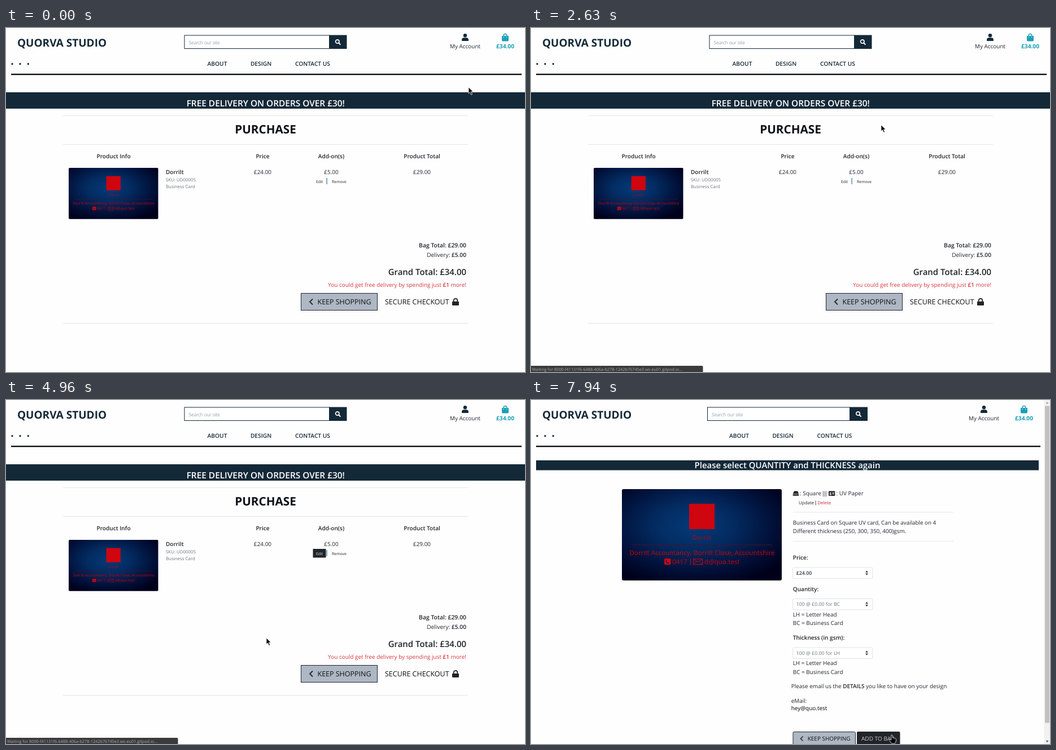
An HTML page for the animation above (8160 ms loop, 919 by 610 pixels).

```html
<!DOCTYPE html>
<html lang="en">
<head>
<meta charset="utf-8">
<title>Shop checkout</title>
<style>
html, body { margin: 0; width: 100%; height: 100%; overflow: hidden; background: #fefefe; }
svg { display: block; width: 919px; height: 610px; }
text { font-family: "Open Sans", "Noto Sans", sans-serif; text-rendering: geometricPrecision; white-space: pre; }
</style>
</head>
<body>
<svg id="stage" viewBox="0 0 919 610"></svg>
<script>
const LOOP = 8160;
const NAVY = '#142938', INK = '#212529', RED = '#d9363e', TEAL = '#1a9fb8', TEAL_DARK = '#0f6674', RULE = '#e6e6e6';

// Text: anchor a = 's' | 'm' | 'e', weight w, fill f, letter spacing ls
function text(x, y, size, str, { a = 's', w = 400, f = INK, ls = 0, id = '' } = {}) {
  const anchor = { s: 'start', m: 'middle', e: 'end' }[a];
  return `<text ${id && `id="${id}"`} x="${x}" y="${y}" font-size="${size}" font-weight="${w}" fill="${f}" text-anchor="${anchor}" letter-spacing="${ls}">${str}</text>`;
}
const bold = s => `<tspan font-weight="600">${s}</tspan>`;
const box = (x, y, w, h, fill, more = '') => `<rect x="${x}" y="${y}" width="${w}" height="${h}" fill="${fill}" ${more}/>`;
const rule = (x1, x2, y) => box(x1, y - .5, x2 - x1, 1, RULE);
const path = (d, fill, more = '') => `<path d="${d}" fill="${fill}" ${more}/>`;
const at = (x, y, body, more = '') => `<g transform="translate(${x} ${y})" ${more}>${body}</g>`;
const chevron = (x, y, s) => path(`M${x + s} ${y - s}l${-s} ${s}l${s} ${s}`, 'none', `stroke="${INK}" stroke-width="${s * .36}"`);

const userIcon = path('M0 0a3.2 3.2 0 0 1 0 6.4a3.2 3.2 0 0 1 0-6.4M-5.9 13v-2.2q0-3.6 3.6-3.6h4.6q3.6 0 3.6 3.6V13z', NAVY);
const bagIcon = path('M-6 4h12v7.7q0 1.8-1.8 1.8h-8.4q-1.8 0-1.8-1.8z', 'currentColor')
  + path('M-2.8 6V3.2a2.8 2.8 0 0 1 5.6 0V6', 'none', 'stroke="currentColor" stroke-width="1.5"')
  + '<circle cx="-2.8" cy="6.2" r=".7" fill="#fff"/><circle cx="2.8" cy="6.2" r=".7" fill="#fff"/>';
const lockIcon = path('M0 6h12v5.8q0 1.2-1.2 1.2H1.2Q0 13 0 11.8z', INK)
  + path('M2.8 7V4a3.2 3.2 0 0 1 6.4 0v3', 'none', `stroke="${INK}" stroke-width="1.8"`);

function header({ left, button, right, nav, user, bag, edge, id }) {
  const links = ['ABOUT', 'DESIGN', 'CONTACT US'];
  return text(20, 32.7, 19, 'QUORVA STUDIO', { w: 700, f: NAVY })
    + box(left + .5, 13, button - left, 23.5, '#fff', `stroke="${NAVY}"`)
    + text(left + 8, 28.6, 8.6, 'Search our site', { f: '#99a5b0', ls: -.3 })
    + box(button, 12.5, right - button, 24.5, NAVY)
    + at((button + right) / 2, 25, `<circle cx="-1" cy="-1" r="3.2" fill="none" stroke="#fff" stroke-width="1.7"/><path d="M1.4 1.4L4.6 4.6" stroke="#fff" stroke-width="2"/>`)
    + links.map((s, i) => text(nav[i], 67.2, 10.2, s, { a: 'm', w: 600, f: NAVY })).join('')
    + [11, 25, 39.3].map(x => `<circle cx="${x}" cy="63.7" r="1.7" fill="${NAVY}"/>`).join('')
    + at(user, 10, userIcon) + text(user, 36.3, 9.95, 'My Account', { a: 'm' })
    + `<g id="${id}" color="${TEAL}">` + at(bag, 10, bagIcon)
    + text(bag, 36.3, 10.2, '£34.00', { a: 'm', w: 700, f: 'currentColor' }) + '</g>'
    + box(9, 81, edge - 9, 2.4, '#0d1114');
}

const cardRed = '#cf0510';
const card = `<g id="card">${box(0, 0, 283, 162, 'url(#night)', 'rx="3"')}`
  + box(119, 26, 45, 45, cardRed)
  + text(141.5, 90, 11.2, 'Dorrilt', { a: 'm', f: '#a80a1c' })
  + box(18, 98.5, 248, 1, '#4a1233')
  + text(142, 116.5, 11.7, 'Dorrilt Accountancy, Dorrilt Close, Accountshire', { a: 'm', f: cardRed })
  + box(75, 123, 11.5, 11, cardRed, 'rx="1.5"')
  + path('M78 125.5q0 5.5 5.5 6', 'none', 'stroke="#04204c" stroke-width="1.6"')
  + text(89, 132.6, 11.7, '0417', { f: cardRed }) + box(121, 123.5, 1, 11, cardRed)
  + path('M126.5 124h16v9.5h-16zl8 5.5l8-5.5m-16 9.5l6-5.4m10 5.4l-6-5.4', 'none', `stroke="${cardRed}"`)
  + text(146, 132.6, 11.7, 'd@quo.test', { f: cardRed }) + '</g>';

const defs = `<defs><radialGradient id="night" cx=".45" cy=".4" r=".68">
<stop offset="0" stop-color="#043a78"/><stop offset=".35" stop-color="#032c62"/>
<stop offset=".72" stop-color="#01113a"/><stop offset="1" stop-color="#00001b"/></radialGradient>${card}</defs>`;

function bagPage() {
  const heads = [[190.5, 'Product Info'], [454.5, 'Price'], [576, 'Add-on(s)'], [736.5, 'Product Total']];
  const prices = [[454.5, '£24.00'], [576, '£5.00'], [736.5, '£29.00']];
  return header({ left: 315.5, button: 572, right: 603.5, nav: [374, 451.5, 543], user: 813, bag: 884, edge: 913, id: 'bag' })
    + box(0, 114, 919, 29, NAVY)
    + text(459.7, 139.2, 15.4, 'FREE DELIVERY ON ORDERS OVER £30!', { a: 'm', w: 600, f: '#fff' })
    + [155.5, 206.5, 523.5].map(y => rule(101, 818, y)).join('')
    + text(459.5, 187, 20.7, 'PURCHASE', { a: 'm', w: 700, f: '#0c1118' })
    + heads.map(([x, s]) => text(x, 231.2, 10.1, s, { a: 'm', w: 600 })).join('')
    + prices.map(([x, s]) => text(x, 259.3, 9.95, s, { a: 'm' })).join('')
    + '<use href="#card" transform="translate(111 248) scale(.56)"/>'
    + text(283, 259.3, 10, 'Dorrilt', { w: 600 })
    + text(283, 272.2, 7.9, 'SKU: UD00005', { f: '#6c757d' })
    + text(283, 284.3, 7.9, 'Business Card', { f: '#6c757d' })
    + box(567.5, 266, 1.2, 11, '#2b7a99')
    + box(543.5, 264, 23, 15.5, INK, 'id="editBg"')
    + text(555, 274.6, 6.9, 'Edit', { a: 'm', id: 'edit' })
    + text(577, 274.6, 6.9, 'Remove')
    + text(815, 388.8, 10.4, 'Bag Total: £29.00', { a: 'e', w: 600 })
    + text(815, 406.2, 10.2, 'Delivery: ' + bold('£5.00'), { a: 'e', w: 500 })
    + text(815, 438.2, 14.95, 'Grand Total: £34.00', { a: 'e', w: 600 })
    + text(815, 458.5, 9.97, `You could get free delivery by spending just ${bold('£1')} more!`, { a: 'e', f: RED })
    + box(522.5, 470.5, 135, 30, '#aeb7c4', `stroke="${INK}"`)
    + chevron(538, 485.5, 5) + text(551.5, 490, 12.47, 'KEEP SHOPPING', { f: '#111' })
    + text(671, 490, 12.47, 'SECURE CHECKOUT', { f: '#111' }) + at(790, 479, lockIcon);
}

function select(y, str, opt) {
  const arrows = path(`M592 ${y + 9.3}l2.5-3.2l2.5 3.2zM592 ${y + 11}l2.5 3.2l2.5-3.2z`, '#343a40');
  return box(463.5, y + .5, 141.5, 19.5, '#fff', 'stroke="#dfe3e7" rx="2"') + text(469.8, y + 13.4, 8.75, str, opt) + arrows;
}

function editPage() {
  const note = y => text(463.7, y, 9.95, 'LH = Letter Head') + text(463.7, y + 15.4, 9.95, 'BC = Business Card');
  const label = (y, s) => text(463.7, y, 10.1, s, { w: 600 });
  const gray = { f: '#6c757d' };
  return box(0, 0, 919, 610, '#fefefe')
    + header({ left: 312, button: 564, right: 596, nav: [368.5, 446, 537.5], user: 802, bag: 873, edge: 902, id: 'bag2' })
    + box(9, 107, 890, 17.5, NAVY)
    + text(454, 120.8, 14.95, 'Please select QUANTITY and THICKNESS again', { a: 'm', w: 600, f: '#fff' })
    + '<use href="#card" transform="translate(161 158)"/>'
    + path('M466 161.5h6l2.3 5h-10.6zM463.7 167.3h10.6v2.5h-10.6z', INK)
    + text(476, 169.2, 9.95, ': Square') + text(514.5, 169.2, 9.95, '|||', { ls: -2.7 })
    + box(527, 161.5, 11.3, 8.6, INK, 'rx="1"')
    + '<circle cx="530.2" cy="165" r="1.2" fill="#fff"/>' + box(528.6, 166.8, 3.3, 1.6, '#fff') + box(533.3, 164, 3.6, 1, '#fff') + box(533.3, 166.2, 3.6, 1, '#fff')
    + text(540.5, 169.2, 9.95, ': UV Paper')
    + text(474, 184.8, 7.95, 'Update') + box(503.7, 178.5, .8, 8, INK)
    + text(507.3, 184.8, 7.95, 'Delete', { f: '#c9253a' })
    + rule(463.5, 748, 199) + rule(463.5, 748, 250.5)
    + text(463.7, 220.8, 9.8, 'Business Card on Square UV card, Can be available on 4')
    + text(463.7, 236.2, 9.95, 'Different thickness (250, 300, 350, 400)gsm.')
    + label(283, 'Price:') + select(296.5, '£24.00', { w: 600, f: '#343a40' })
    + label(338.7, 'Quantity:') + select(352, '100 @ £0.00 for BC', gray) + note(383.8)
    + label(424.8, 'Thickness (in gsm):') + select(438.5, '100 @ £0.00 for LH', gray) + note(470.2)
    + text(460.7, 511, 9.94, `Please email us the ${bold('DETAILS')} you like to have on your design`)
    + text(460.7, 536.6, 9.95, 'eMail:') + text(460.7, 550.2, 9.95, 'hey@quo.test', { f: '#000' })
    + box(464, 588.5, 110.5, 30, '#aeb7c4', `stroke="${INK}" rx="2"`)
    + chevron(477.5, 600.5, 4) + text(489.7, 604.4, 9.98, 'KEEP SHOPPING', { f: '#111' })
    + box(577, 588, 76.5, 30, INK, 'id="addBg" rx="2"')
    + text(585, 604.4, 10.05, 'ADD TO BAG', { id: 'add' })
    + box(908.5, 0, 10.5, 610, '#f1f1f1') + box(910, 10.5, 8, 562, '#c1c1c1')
    + path('M911.5 6.5l2.5-3l2.5 3z', '#9a9a9a') + path('M911.5 604l2.5 3l2.5-3z', '#505050');
}

const outline = 'stroke="#fff" stroke-width=".8" stroke-linejoin="round"';
const arrow = path('M0 0v11.2l2.6-2.4l2 4.6l2-.9l-2-4.4h3.6z', '#000', outline);
const hand = path('M-1.3 1q0-1.2 1.2-1.2T1.2 1v4l5 1.2q1.5.4 1.4 2l-.7 4.3q-.4 2.7-2.8 2.7H.8q-1.6 0-2.4-1.4l-2.9-4.3q-.6-1.2.6-1.6l2.6.9z', '#000', outline);

document.getElementById('stage').innerHTML = defs
  + `<g id="page1">${bagPage()}</g><g id="page2">${editPage()}</g>`
  + `<g id="status">${path('M0 599h302.500q2 0 2 2v9H0z', '#3b3b3b')}${text(2, 607.8, 7.3, '', { f: '#a9adb1', id: 'statusText' })}</g>`
  + `<g id="cursor"><g id="arrow">${arrow}</g><g id="hand">${hand}</g></g>`;

const el = {};
document.querySelectorAll('[id]').forEach(n => el[n.id] = n);
const show = (n, on) => n.setAttribute('visibility', on ? 'visible' : 'hidden');

// The screen refreshes in bursts: start, end, number of steps
const bursts = [[70, 300, 4], [470, 850, 6], [1020, 1700, 10], [1870, 2170, 4], [2320, 3100, 11], [3180, 3960, 11],
  [4030, 4350, 5], [4660, 5440, 11], [5510, 6280, 11], [6360, 7150, 11], [7240, 7940, 10]];

function snap(t) {
  let s = 0;
  for (const [from, to, n] of bursts) {
    if (t < from) break;
    const gap = (to - from) / (n - 1);
    s = from + gap * Math.min(n - 1, Math.floor((t - from) / gap + .2));
  }
  return s;
}

// Pointer path: time, x, y
const track = [[0, 819, 105], [300, 911, 23], [620, 900, 1], [850, 884, 60], [1170, 880, 35], [1870, 880, 35], [2170, 878, 39],
  [2550, 700, 150], [3100, 163, 297], [3414, 528, 243], [3648, 758, 219], [3960, 554, 268], [4660, 554, 268],
  [4972, 461, 422], [5440, 600, 276], [5510, 604, 273], [5664, 552, 328], [6280, 446, 525], [6439, 434, 560], [6518, 426, 573],
  [7150, 696, 320], [7467, 408, 313], [7864, 630, 592], [7940, 639, 594], [LOOP, 639, 594]];

function pointer(t) {
  const i = Math.max(1, track.findIndex(k => k[0] > t));
  const [t0, x0, y0] = track[i - 1], [t1, x1, y1] = track[i];
  const p = (t - t0) / (t1 - t0);
  return [x0 + (x1 - x0) * p, y0 + (y1 - y0) * p];
}

const host = '8000-f41131f6-6488-406a-b278-1242b76745e3.ws-eu01.gitpod.io';
const editUrl = host + '/purchase/edit/.../ec...';
const messages = [[0, ''], [1240, host + '/purchase/'], [1540, 'Waiting for m.stripe.com...'], [1960, `Waiting for ${host}...`],
  [2700, ''], [4030, editUrl], [4730, `Waiting for ${host}...`], [5270, editUrl], [5950, '']];

function draw(time) {
  const t = snap(time), within = (a, b) => t >= a && t < b;
  const [x, y] = pointer(t);
  const onBag = within(1160, 2400), onEdit = within(3950, 5270), onAdd = t >= 7850;
  const pointing = within(1160, 1870) || within(3950, 4720) || onAdd;
  const message = messages.filter(m => m[0] <= t).pop()[1];

  show(el.page2, t >= 5270);
  show(el.editBg, onEdit);
  show(el.addBg, onAdd);
  if (t >= 5270) show(el.editBg, false);
  else show(el.addBg, false);
  el.bag.setAttribute('color', onBag ? TEAL_DARK : TEAL);
  el.edit.setAttribute('fill', onEdit ? '#d5d8db' : INK);
  el.add.setAttribute('fill', onAdd ? '#c9ccd0' : INK);
  show(el.status, message);
  el.statusText.textContent = message;
  show(el.arrow, !pointing);
  show(el.hand, pointing);
  el.cursor.setAttribute('transform', `translate(${x} ${y})`);
}

const begin = performance.now();
function tick() {
  draw((performance.now() - begin) % LOOP);
  requestAnimationFrame(tick);
}
tick();
</script>
</body>
</html>
```
